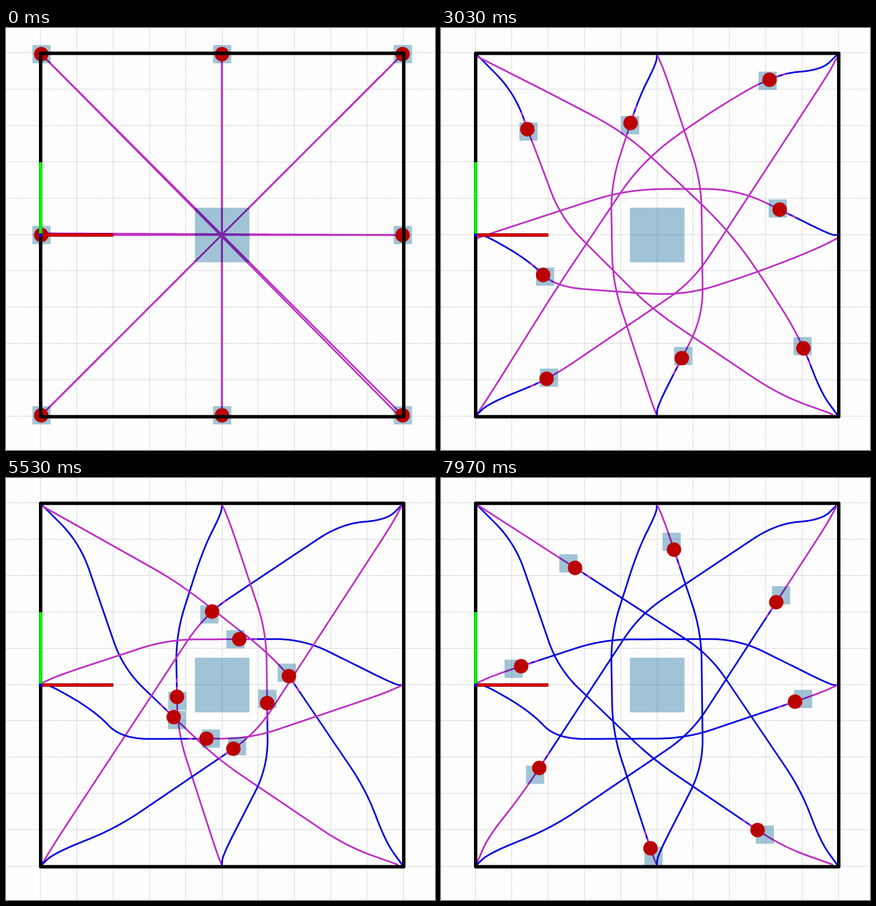
Write an HTML page with a canvas that moves like this. It is 755x742 px and loops after 8000 ms.

```html
<!DOCTYPE html>
<html>
<head>
<meta charset="utf-8">
<style>
  html, body { margin: 0; width: 100%; height: 100%; overflow: hidden; background: #fdfdfd; }
  canvas { display: block; }
</style>
</head>
<body>
<canvas width="755" height="742"></canvas>
<script>
const ctx = document.querySelector('canvas').getContext('2d');
const LOOP = 8000;
const MARK_TIMES = [0, 1230, 1470, 2330, 3870, 4830, 6330, 7970];
const LEADS = [0, 0, 0, 4, 4.5, 4.5, 10.5, 14.5];
const PLAN_TIMES = [30, 1470, 2330, 3870];
const MAGENTA = '#bd30c4', BLUE = '#0606e0', TINT = '#a2c5d8';

// axis: coordinate (0 = x, 1 = y) that always advances along the route.
// marks: its value at MARK_TIMES. Routes and plans are polygons with rounded corners.
const agents = [
  { axis: 1, marks: [46, 46, 52, 112, 262, 358, 488, 619],
    route: '62,46 130,114 206,335 372,494 600,648 690,680',
    plans: ['', '62,46 122,112 235,328 368,498 570,632 693,676'] },
  { axis: 1, marks: [46, 46, 52, 105, 245, 327, 457, 651],
    route: '380,46 379,62 347,125 299,275 302,447 372,662 380,681',
    plans: ['380,46 380,62 300,195 237,370 372,668 380,681'] },
  { axis: 0, marks: [698, 698, 692, 640, 500, 418, 301, 173],
    route: '698,46 670,74 590,80 350,240 140,560 82,632 62,681',
    plans: ['698,46 685,62 590,95 375,218 145,515 62,681',
      '698,46 670,76 535,76 432,127 205,428 88,662 62,681',
      '698,46 670,74 590,80 350,240 88,638 62,681'],
    settle: [6330, 7970] },
  { axis: 0, marks: [698, 698, 692, 640, 541, 468, 337, 141],
    route: '698,364 686,364 523,283 284,284 95,346 62,361',
    plans: ['', '', '698,364 686,364 523,283 335,283 62,372'],
    settle: [3870, 4830] },
  { axis: 1, marks: [681, 681, 676, 625, 485, 404, 286, 158],
    route: '698,681 668,640 634,549 472,310 62,46',
    plans: ['698,681 698,665 600,475 520,360 370,232 120,102 62,46',
      '698,681 668,640 608,465 565,400 463,303 220,127 62,46',
      '698,681 668,640 634,549 505,358 330,185 62,50'],
    settle: [4830, 6330] },
  { axis: 1, marks: [681, 681, 676, 625, 525, 453, 322, 126],
    route: '380,681 381,664 461,508 458,270 394,78 380,46',
    plans: [] },
  { axis: 0, marks: [62, 62, 70, 123, 265, 346, 461, 590],
    route: '62,681 84,660 195,615 440,449 680,80 698,46',
    plans: ['62,681 115,648 250,555 400,482 525,355 590,262 698,46',
      '62,681 84,660 185,612 460,430 698,72'] },
  { axis: 0, marks: [62, 62, 70, 130, 238, 297, 427, 623],
    route: '62,364 78,364 158,411 203,459 431,458 665,379 698,364',
    plans: ['62,364 130,395 190,415 310,491 440,491 698,364',
      '62,364 78,364 310,490 390,523 500,523 607,472 698,398'] },
];

const clamp = v => Math.max(0, Math.min(1, v));
const mix = (a, b, u) => a + (b - a) * u;

function roundCorners(points, cut) {
  const out = [points[0]];
  for (let i = 1; i < points.length - 1; i++) {
    const corner = points[i];
    const toward = other => {
      const length = Math.hypot(other[0] - corner[0], other[1] - corner[1]);
      const u = Math.min(cut / length, 0.5);
      return [0, 1].map(k => mix(corner[k], other[k], u));
    };
    const a = toward(points[i - 1]), b = toward(points[i + 1]);
    for (let j = 0; j <= 12; j++) {
      const u = j / 12;
      out.push([0, 1].map(k => mix(mix(a[k], corner[k], u), mix(corner[k], b[k], u), u)));
    }
  }
  out.push(points[points.length - 1]);
  return out;
}

// Turns a polyline into a function: advancing coordinate -> other coordinate.
function curve(points, axis, cut) {
  const line = roundCorners(points, cut);
  const dir = Math.sign(line[line.length - 1][axis] - line[0][axis]);
  return m => {
    let i = 1;
    while (i < line.length - 1 && dir * (line[i][axis] - m) < 0) i++;
    const a = line[i - 1], b = line[i], span = b[axis] - a[axis];
    return mix(a[1 - axis], b[1 - axis], span ? clamp((m - a[axis]) / span) : 1);
  };
}

const parse = text => text.split(' ').map(pair => pair.split(',').map(Number));

for (const agent of agents) {
  const points = parse(agent.route), ends = [points[0], points[points.length - 1]];
  const { axis, plans } = agent;
  agent.start = ends[0][axis];
  agent.end = ends[1][axis];
  agent.dir = Math.sign(agent.end - agent.start);
  agent.cross = curve(points, axis, 50);
  const straight = curve(ends, axis, 0);
  const plan = (i, fallback, cut) => plans[i] ? curve(parse(plans[i]), axis, cut) : fallback;
  agent.stages = [straight, plan(0, straight, 100), plan(1, agent.cross, 60), plan(2, agent.cross, 60)];
}

function segment(t) {
  let i = 0;
  while (i < MARK_TIMES.length - 2 && t >= MARK_TIMES[i + 1]) i++;
  return [i, clamp((t - MARK_TIMES[i]) / (MARK_TIMES[i + 1] - MARK_TIMES[i]))];
}

function progress(marks, t) {
  const [i, u] = segment(t), last = marks.length - 1;
  const slope = k => {
    if (k < 2) return 0;
    const n = Math.min(k + 1, last);
    return (marks[n] - marks[k - 1]) / (MARK_TIMES[n] - MARK_TIMES[k - 1]);
  };
  const h = MARK_TIMES[i + 1] - MARK_TIMES[i], v = 1 - u;
  return marks[i] * v * v * (1 + 2 * u) + marks[i + 1] * u * u * (3 - 2 * u)
    + h * u * v * (slope(i) * v - slope(i + 1) * u);
}

function plannedCross(agent, m, t) {
  if (t >= PLAN_TIMES[3]) {
    const [from, to] = agent.settle || [3870, 4830];
    return mix(agent.stages[3](m), agent.cross(m), clamp((t - from) / (to - from)));
  }
  let i = 0;
  while (t >= PLAN_TIMES[i + 1]) i++;
  const u = clamp((t - PLAN_TIMES[i]) / (PLAN_TIMES[i + 1] - PLAN_TIMES[i]));
  return mix(agent.stages[i](m), agent.stages[i + 1](m), 1 - (1 - u) ** 3);
}

const place = (agent, m, c) => agent.axis ? [c, m] : [m, c];

function trace(agent, from, to, cross, color, dash = []) {
  const length = Math.max(0, (to - from) * agent.dir);
  ctx.beginPath();
  for (let d = 0; d < length; d += 2) {
    const m = from + d * agent.dir;
    ctx.lineTo(...place(agent, m, cross(m)));
  }
  ctx.lineTo(...place(agent, to, cross(to)));
  ctx.setLineDash(dash);
  ctx.strokeStyle = color;
  ctx.lineWidth = 3;
  ctx.stroke();
  ctx.setLineDash([]);
}

function line(x1, y1, x2, y2, color, width) {
  ctx.strokeStyle = color;
  ctx.lineWidth = width;
  ctx.beginPath();
  ctx.moveTo(x1, y1);
  ctx.lineTo(x2, y2);
  ctx.stroke();
}

function square(x, y, size) {
  ctx.fillStyle = TINT;
  ctx.fillRect(x - size / 2, y - size / 2, size, size);
}

function dot(x, y, r, color) {
  ctx.fillStyle = color;
  ctx.beginPath();
  ctx.arc(x, y, r, 0, 2 * Math.PI);
  ctx.fill();
}

function drawGrid() {
  for (let i = 0; i <= 10; i++) {
    const x = Math.round(61 + i * 63.9) - 0.5, y = Math.round(44 + i * 63.9) - 0.5;
    for (const [color, dash] of [['#e6e6d6', []], ['#cacaea', [2, 2]]]) {
      ctx.setLineDash(dash);
      line(x, 0, x, 742, color, 1);
      line(0, y, 755, y, color, 1);
    }
  }
  ctx.setLineDash([]);
}

function draw(t) {
  ctx.fillStyle = '#fdfdfd';
  ctx.fillRect(0, 0, 755, 742);
  drawGrid();

  const [i, u] = segment(t), lead = mix(LEADS[i], LEADS[i + 1], u);
  const discs = [], squares = [];
  for (const agent of agents) {
    const { cross, dir, start, end } = agent;
    const m = progress(agent.marks, t), c = cross(m);
    const slope = (cross(m + 2) - cross(m - 2)) / 4;
    const unit = dir / Math.hypot(1, slope);
    const ahead = m + lead * unit;
    discs.push(place(agent, m, c));
    squares.push(place(agent, ahead, cross(ahead)));

    // The plan always leaves from the disc, so its offset there fades out.
    const offset = c - plannedCross(agent, m, t);
    trace(agent, m, end, p => plannedCross(agent, p, t) + offset * Math.exp(-Math.abs(p - m) / 40), MAGENTA);
    trace(agent, start, m, cross, BLUE);
    const recent = m - 32 * unit;
    if ((recent - start) * dir > 0) trace(agent, recent, m, cross, MAGENTA, [7, 7]);
  }

  ctx.globalCompositeOperation = 'multiply';
  square(380.5, 364, 96);
  for (const [x, y] of squares) square(x + 0.5, y, 32);
  ctx.globalCompositeOperation = 'source-over';
  for (const [x, y] of discs) dot(x, y, 12.7, '#ba0000');

  ctx.lineJoin = 'round';
  ctx.strokeStyle = '#000';
  ctx.lineWidth = 6;
  ctx.strokeRect(61, 44.5, 639, 639);
  line(61, 364, 189, 364, '#8c0000', 6);
  line(61, 364, 188, 364, '#dc0000', 4);
  line(61, 364, 61, 236, '#00b400', 6);
  line(61, 364, 61, 236, '#00fa00', 4.5);
  dot(61, 364, 3, '#0000e0');
}

const began = performance.now();
function frame() {
  draw((performance.now() - began) % LOOP);
  requestAnimationFrame(frame);
}
frame();
</script>
</body>
</html>
```
